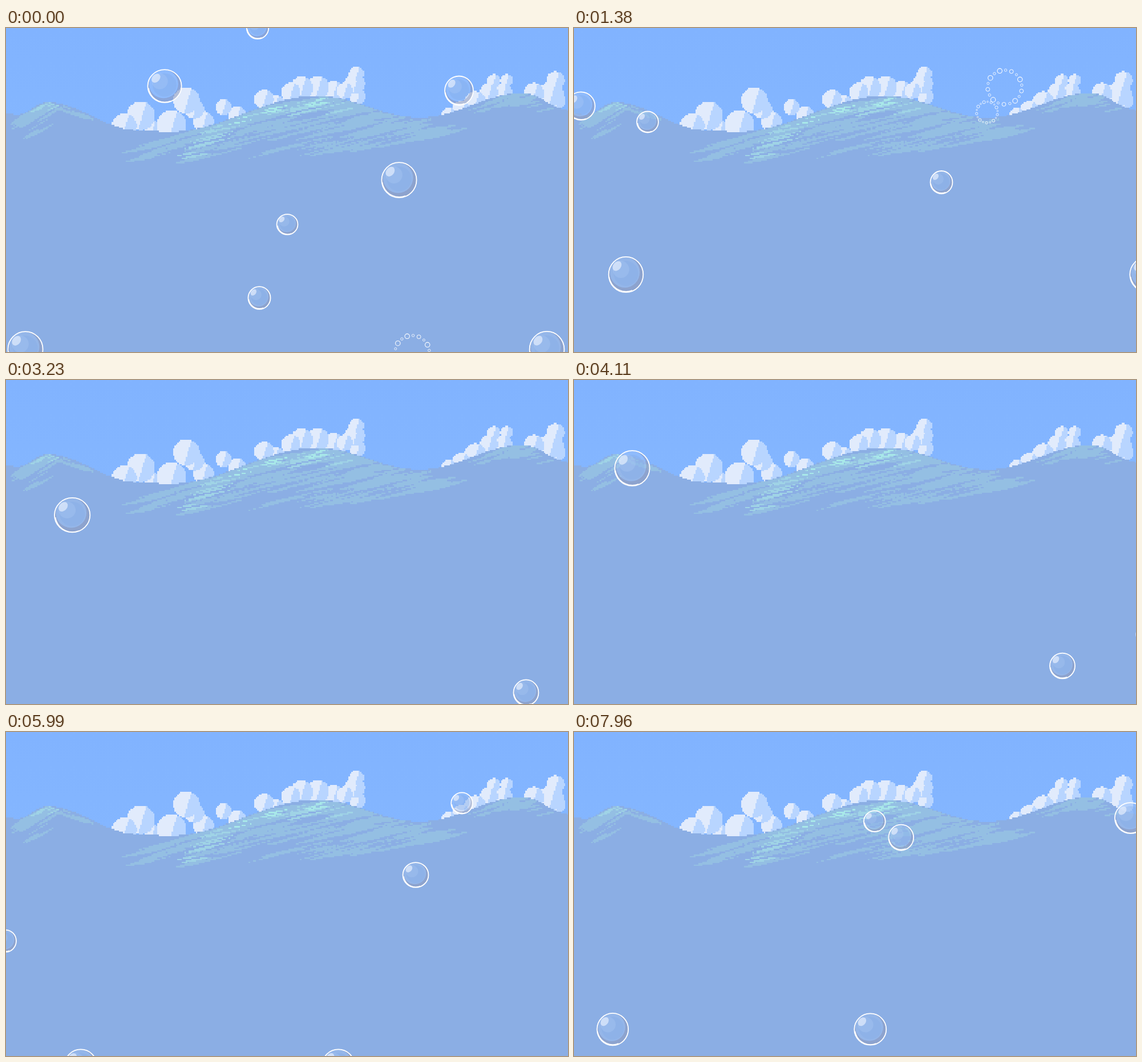
Animation, 985 px wide and 569 px high, one loop 8 s. Source, as an HTML page with a canvas:

```html
<!DOCTYPE html>
<html lang="en">
<head>
<meta charset="utf-8">
<title>Bubbles over the sea</title>
<style>
html, body { margin: 0; width: 100%; height: 100%; overflow: hidden; background: #8baee4; }
canvas { display: block; width: 985px; height: 569px; }
</style>
</head>
<body>
<canvas id="stage" width="985" height="569"></canvas>
<script>
const W = 985, H = 569, CELL = 2.5, LOOP = 8000, STEPS = 65;
const SEA = '#8baee4', FOAM = '#94bfe3', MINT = '#9fd3e6', GLINT = '#a8e8e9';
const WHITE = '#e1ebfc', SHADE = '#b8d5ff';
const ctx = document.getElementById('stage').getContext('2d');

// ---- Pixel-art scenery, painted once on a coarse grid ----
const back = document.createElement('canvas');
back.width = Math.ceil(W / CELL);
back.height = Math.ceil(H / CELL);
const bg = back.getContext('2d');

let seed = 7;
const rnd = () => (seed = seed * 16807 % 2147483647) / 2147483647;

// Fills the cells of a box; color(x, y) gives a colour or a false value
function paint(x0, y0, x1, y1, color) {
  for (let j = Math.floor(y0 / CELL); j <= y1 / CELL; j++)
    for (let i = Math.floor(x0 / CELL); i <= x1 / CELL; i++) {
      const c = color((i + .5) * CELL, (j + .5) * CELL);
      if (!c) continue;
      bg.fillStyle = c;
      bg.fillRect(i, j, 1, 1);
    }
}

// Crests and troughs of the sea, joined by cosine curves
const swell = [[0, 150], [20, 152], [72, 130], [230, 179], [285, 182], [545, 119], [725, 157], [905, 114], [988, 144]];
function horizon(x) {
  let i = 0;
  while (i < swell.length - 2 && x > swell[i + 1][0]) i++;
  const [a, p] = swell[i], [b, q] = swell[i + 1];
  return p + (q - p) * (1 - Math.cos(Math.PI * (x - a) / (b - a))) / 2;
}

// Round puffs: x, y, radius; lit from the left
const puffs = [
  [256, 176, 14], [236, 154, 25], [207, 172, 22],
  [346, 164, 18], [330, 142, 17], [316, 127, 23], [290, 170, 26],
  [405, 153, 16], [381, 139, 14], [470, 136, 19], [452, 125, 17],
  [574, 112, 19], [546, 104, 20], [518, 105, 20], [499, 113, 17],
  [616, 120, 14], [611, 98, 18], [614, 80, 13], [593, 110, 14],
  [872, 111, 15], [877, 92, 11], [854, 93, 12], [846, 113, 16], [822, 130, 19], [798, 145, 17], [776, 153, 13],
  [967, 128, 14], [955, 116, 22], [963, 92, 16], [925, 114, 18]
];

// Tapered strokes scattered between two curves
function streaks(color, n, x0, x1, top, bottom, slope, len, width) {
  while (n--) {
    const cx = x0 + rnd() * (x1 - x0), t = top(cx), cy = t + rnd() * (bottom(cx) - t);
    const l = len * (.5 + rnd()), w = width * (.4 + .6 * rnd()), h = l * Math.abs(slope) + w;
    paint(cx - l, cy - h, cx + l, cy + h, (x, y) => y > horizon(x) + 1 &&
      Math.abs(y - cy + slope * (x - cx)) < w * (1 - ((x - cx) / l) ** 2) && color);
  }
}

function scenery() {
  const sky = bg.createLinearGradient(0, 0, 0, 70);
  sky.addColorStop(0, '#81b3ff');
  sky.addColorStop(1, '#84b6ff');
  bg.fillStyle = sky;
  bg.fillRect(0, 0, back.width, back.height);

  for (const [cx, cy, r] of puffs)
    paint(cx - r, cy - r, cx + r, cy + r, (x, y) => x < 981 && Math.hypot(x - cx, y - cy) < r &&
      (x - cx + .3 * (y - cy) < .1 * r ? WHITE : SHADE));
  paint(0, 110, W, H, (x, y) => y > horizon(x) && SEA);

  const below = d => x => horizon(x) + d;
  const top = x => Math.max(horizon(x), 210 - (x - 230) * .3, 150 + (x - 620) * .25);
  const bottom = x => Math.min(230, 230 - (x - 520) * .17);
  streaks(FOAM, 130, 235, 765, top, bottom, .24, 40, 4.5);
  streaks(FOAM, 40, 370, 670, below(2), below(14), .12, 40, 4);
  streaks(SEA, 45, 260, 700, x => top(x) + 22, bottom, .26, 32, 2.2);
  streaks(MINT, 16, 350, 600, below(4), below(28), .24, 26, 2.4);
  streaks(MINT, 7, 300, 370, below(30), below(48), .2, 22, 2);
  streaks(GLINT, 8, 400, 560, below(5), below(18), .2, 18, 1.8);

  streaks(FOAM, 22, 25, 80, below(3), below(22), .6, 20, 4);
  streaks(FOAM, 4, 40, 75, below(35), below(50), .6, 18, 2.5);
  streaks(FOAM, 9, 80, 140, below(3), below(16), -.3, 16, 2.5);
  streaks(MINT, 6, 45, 85, below(2), below(12), .45, 15, 2);
  streaks(FOAM, 28, 825, 920, below(2), below(18), .28, 22, 3);
  streaks(FOAM, 4, 850, 960, below(12), below(28), .2, 18, 2);
}

// ---- Bubbles: points are [step, x, y]; dx makes a side-by-side twin ----
const rise = [[0, 34, 564], [11, 91, 433], [19, 122, 317], [33, 102, 155], [45.5, 73, -36]];
const late = [[46, 146, 604], [48, 131, 585], [58, 80, 541], [65, 66, 519]];
const bubbles = [
  { r: 20, path: [[0, 441, 0], [2.4, 470, -42]] },
  { r: 30, path: [[0, 278, 102], [10.4, 332, -36]] },
  { r: 26, path: [[0, 794, 110], [11, 850, -40]] },
  { r: 31.5, path: [[0, 689, 267], [11, 755, 104]] },
  { r: 19, path: [[0, 493, 345], [11, 724, 148]] },
  { r: 20.5, path: [[0, 444, 474], [11, 644, 271], [19, 757, 75], [23, 805, -30]] },
  { r: 25.5, path: [[5.5, -27, 238], [11, 12, 137], [19, 70, -2], [21, 85, -40]] },
  { r: 19.5, path: [[3, -22, 318], [11, 129, 165], [17.6, 225, -22]] },
  { r: 31.5, path: rise },
  { r: 31.5, path: rise.slice(0, 3), dx: 914 },
  { r: 23, path: [[18, 966, 590], [19, 963, 577], [33, 856, 502], [48, 718, 251], [58, 597, 184], [65, 570, 186]] },
  { r: 19.5, path: [[24, 1002, 584], [33, 1004, 447], [48, 799, 125], [58, 580, 102], [65, 519, 167]] },
  { r: 20, path: [[35, 195, 590], [48, -1, 367], [50, -31, 333]] },
  { r: 28.6, path: late },
  { r: 28.6, path: late, dx: 451.5 },
  { r: 28, path: [[52.6, 1016, 195], [58, 985, 165], [65, 974, 149]] }
];
// Bursts: first step, x, y, radius
const bursts = [[-1, 712, 570, 30], [11, 755, 104, 30], [11, 724, 148, 18.5]];

// Smooth position on a path at step k, or null outside of it
function locate(path, k) {
  const n = path.length;
  if (k < path[0][0] || k >= path[n - 1][0]) return null;
  let i = 0;
  while (k >= path[i + 1][0]) i++;
  const h = path[i + 1][0] - path[i][0], s = (k - path[i][0]) / h;
  const slope = (j, c) => {
    const a = path[Math.max(0, j - 1)], b = path[Math.min(n - 1, j + 1)];
    return (b[c] - a[c]) / (b[0] - a[0]) * h;
  };
  return [1, 2].map(c => {
    const a = path[i][c], d = path[i + 1][c] - a, m = slope(i, c), q = slope(i + 1, c);
    return a + s * (m + s * (3 * d - 2 * m - q + s * (m + q - 2 * d)));
  });
}

function disc(x, y, rx, ry, fill, turn = 0) {
  ctx.beginPath();
  ctx.ellipse(x, y, rx, ry, turn, 0, 7);
  ctx.fillStyle = fill;
  ctx.fill();
}

function bubble(x, y, r, wobble) {
  ctx.save();
  ctx.translate(x, y);
  ctx.scale(r / 32 * (1 + wobble), r / 32 * (1 - wobble));
  // Shadow crescent at the lower right
  ctx.beginPath();
  ctx.arc(0, 0, 31, 0, 7);
  ctx.moveTo(25, -4);
  ctx.arc(-2, -4, 27, 0, 7);
  ctx.fillStyle = 'rgba(145,155,190,.55)';
  ctx.fill('evenodd');
  disc(-2, -4, 27, 27, 'rgba(170,200,244,.3)');
  disc(0, -2, 22, 22, 'rgba(130,170,230,.35)');
  disc(-9, -9, 15, 15, 'rgba(190,213,248,.2)', -.7);
  disc(-16, -15, 7, 9.5, 'rgba(226,236,252,.72)', .7);
  ctx.restore();
  ctx.beginPath();
  ctx.ellipse(x, y, (r - .8) * (1 + wobble), (r - .8) * (1 - wobble), 0, 0, 7);
  ctx.strokeStyle = '#fff';
  ctx.lineWidth = 1.8;
  ctx.stroke();
  // Heavier rim at the lower left
  ctx.beginPath();
  ctx.arc(x + .4, y - .4, r - 1.4, 1.2, 3);
  ctx.lineWidth = 1.4;
  ctx.stroke();
}

// A ring of 18 droplets in four sizes
function burst(x, y, r, age) {
  const grow = Math.max(0, age - 1) / 4, k = r / 30, ring = r * (1 + .25 * grow);
  ctx.strokeStyle = '#fff';
  for (let i = 0; i < 18; i++) {
    const a = -1.87 + i * Math.PI / 9, size = [4.2, 2.2, 3.4, 2][i % 4] * k * (1 - .6 * grow);
    ctx.lineWidth = .5 + .14 * size;
    ctx.beginPath();
    ctx.arc(x + ring * Math.cos(a), y + ring * Math.sin(a), size, 0, 7);
    ctx.stroke();
  }
}

function draw(now) {
  const k = Math.floor(now % LOOP / LOOP * STEPS);
  ctx.imageSmoothingEnabled = false;
  ctx.drawImage(back, 0, 0, back.width * CELL, back.height * CELL);
  bubbles.forEach(({ r, path, dx = 0 }, i) => {
    const at = locate(path, k);
    if (at) bubble(at[0] + dx, at[1], r, .015 * Math.sin(k * .65 + i * 2));
  });
  for (const [start, x, y, r] of bursts)
    if (k >= start && k < start + 5) burst(x, y, r, k - start);
  requestAnimationFrame(draw);
}

scenery();
requestAnimationFrame(draw);
</script>
</body>
</html>
```
